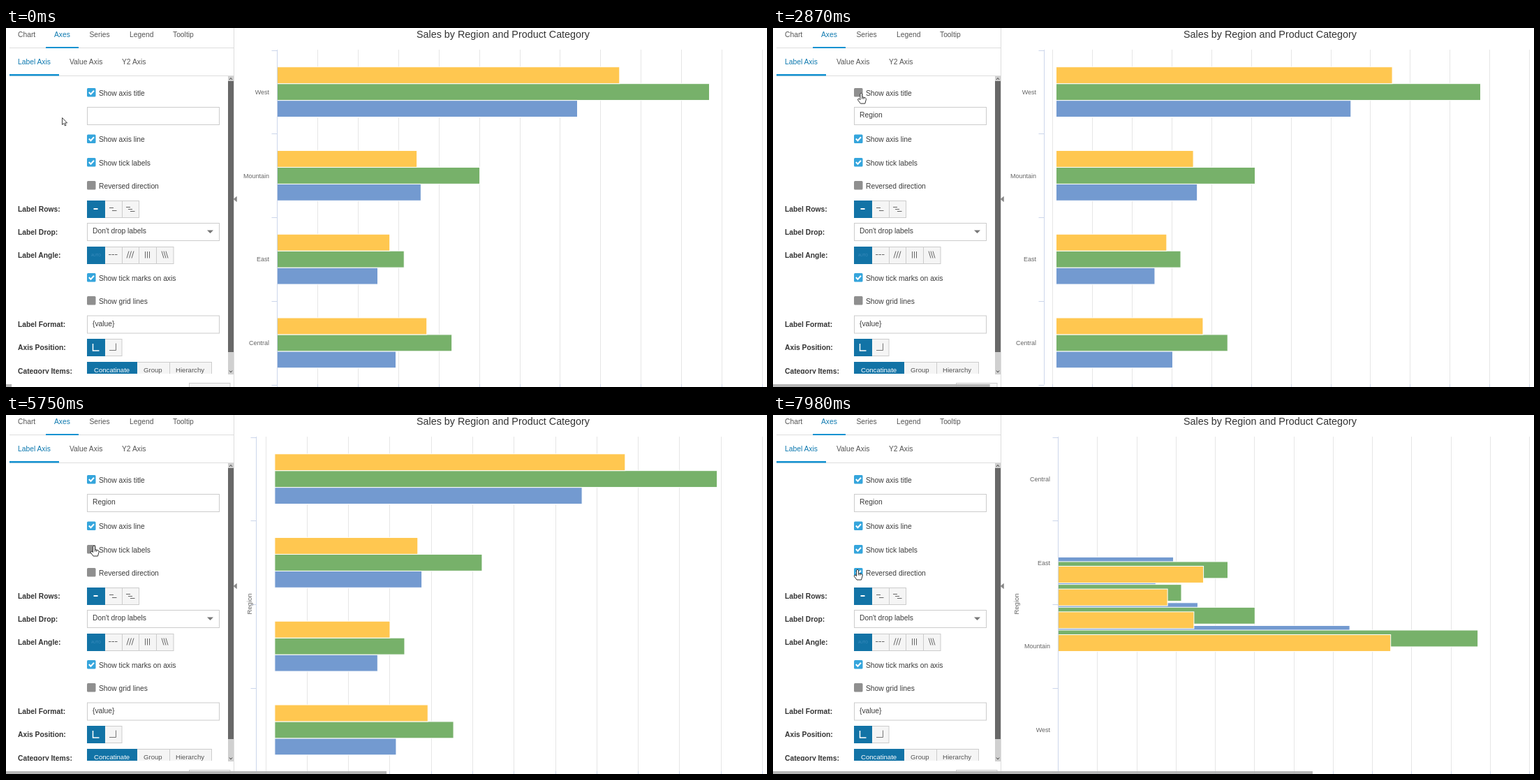
Recreate the animation shown at these times as an HTML page. Size 1090 by 514 pixels, loop 8 s.

```html
<!DOCTYPE html>
<html lang="en">
<head>
<meta charset="utf-8">
<title>Chart axis settings</title>
<style>
  html, body { margin: 0; width: 100%; height: 100%; overflow: hidden; background: #fff; }
  svg { display: block; font: 10.3px "Liberation Sans", Arial, sans-serif; fill: #3c3c3c; }
  .bold { font-weight: bold; fill: #333; }
  .tab { fill: #555; }
  .active { fill: #0f7ab0; }
  .small { font-size: 9.6px; }
  .category { font-size: 9px; fill: #666; text-anchor: end; }
  .click { mix-blend-mode: multiply; }
</style>
</head>
<body>
<svg width="1090" height="514" viewBox="0 0 1090 514">
  <g id="panel"></g><g id="controls"></g><g id="chart"></g><g id="overlay"></g>
</svg>
<script>
const LOOP = 8000, RIGHT = 1083, TOP = 31.5, PITCH = 119.75, BAR = 23.95;
const BLUE = '#1273a6', SKY = '#35a5dc', LINE = '#ddd', GRID = '#e6e6e6', AXIS = '#ccd6eb';
const COLORS = ['#ffc750', '#77b16a', '#739ad0'];
const REGIONS = [
  ['West', .7055, .8907, .6187],
  ['Mountain', .288, .4175, .2962],
  ['East', .232, .2615, .2072],
  ['Central', .3083, .36, .2446]
];

// Moments when the settings change
const TYPE = 760, FOCUS = 500, TITLE_OFF = 2660, TITLE_ON = 2880;
const LINE_OFF = 4020, LINE_GONE = 4770, LINE_ON = 5000;
const LABELS_OFF = 5425, LABELS_ON = 6150, REVERSE = 7687;
const PLOT_LEFT = [[0, 388], [TYPE, 408], [TITLE_OFF, 388], [TITLE_ON, 408], [LABELS_OFF, 358], [LABELS_ON, 408]];
const CLICKS = [[FOCUS, 650], [TITLE_OFF, 2780], [TITLE_ON, 3000], [LINE_OFF, 4850], [LINE_ON, 5100],
  [LABELS_OFF, 5560], [LABELS_ON, 6290], [7660, 7790]];
const POINTER = [[0, 80, 128], [120, 80, 128], [500, 165, 124], [1700, 165, 124], [2080, 131, 99], [2500, 128, 94],
  [3000, 126, 93], [3400, 121, 122], [3500, 121, 122], [3900, 126, 152], [5040, 126, 152], [5360, 126, 187],
  [6300, 126, 187], [7370, 121, 217], [7650, 121, 218], [7800, 121, 221], [LOOP, 121, 221]];
const PROGRESS = [[0, 8], [2080, 228], [3400, 366], [4040, 433], [4769, 433], [4770, 440], [5750, 545],
  [7370, 707], [LOOP, 775]];

const $ = id => document.getElementById(id);
const clamp = v => Math.min(1, Math.max(0, v));
const ease = v => .5 - Math.cos(Math.PI * clamp(v)) / 2;
const mix = (a, b, p) => a + (b - a) * p;
const within = (t, from, to) => t >= from && t < to;

const text = (x, y, s, cls = '') => `<text x="${x}" y="${y}" class="${cls}">${s}</text>`;
const rect = (x, y, w, h, fill, more = '') => `<rect x="${x}" y="${y}" width="${w}" height="${h}" fill="${fill}" ${more}/>`;
const path = (d, stroke, width = 1, fill = 'none') => `<path d="${d}" stroke="${stroke}" stroke-width="${width}" fill="${fill}"/>`;
const field = (y, stroke = '#ccc') => rect(116.5, y + .5, 189, 25, '#fff', `stroke="${stroke}"`);

function checkbox(y, label, on) {
  return rect(116, y - 6.5, 12.5, 12.5, on ? SKY : '#8f8f8f', 'rx="1.5"') +
    (on ? path(`M118.8 ${y - .5}l2.6 2.8 4.6-5`, '#fff', 2) : '') + text(133, y + 4, label);
}

function buttons(y, h, edges) {
  return edges.slice(1).map((end, i) => rect(edges[i] + .5, y + .5, end - edges[i], h,
    i ? '#f5f5f5' : BLUE, `stroke="${i ? '#ccc' : BLUE}"`)).reverse().join('');
}

function drawPanel() {
  const tabs = [[17, 13, 'Chart'], [69, 13, 'Axes'], [119.5, 13, 'Series'], [177, 13, 'Legend'], [239, 13, 'Tooltip'],
    [17, 52, 'Label Axis'], [91, 52, 'Value Axis'], [166, 52, 'Y2 Axis']];
  const labels = [[263, 'Label Rows:'], [296, 'Label Drop:'], [329, 'Label Angle:'], [428, 'Label Format:'], [461, 'Axis Position:']];
  return path('M5 28.5H326M5 68.5H326M326.5 0V514', LINE) +
    rect(57, 27, 47, 2, '#1492d1') + rect(5, 66, 71, 2.5, '#1492d1') +
    tabs.map(([x, y, s]) => text(x, y, s, /^Axes|^Label/.test(s) ? 'active' : 'tab')).join('') +
    labels.map(([y, s]) => text(17, y, s, 'bold')).join('') +
    // scrollbar and panel handle
    rect(318, 69, 8, 427, '#d0d0d0') + rect(318, 76, 8, 388, '#686868') +
    path('M320 74l2-2.5 2 2.5M320 490.500l2 2.5 2-2.500', '#444') +
    path('M330.500 241v8l-4.500-4z', 'none', 0, '#888') +
    // label rows
    buttons(247, 24, [116, 141, 166, 190]) + path('M125.500 259H131.500', '#fff', 2) +
    path('M148 257.500h6M152 261.500h6.500M172 256.500h6M175 259.500h6M178 262.500h6.500', '#666') +
    // label drop
    field(279) + text(124, 294, "Don't drop labels") + path('M288 289.500h9l-4.500 4.500z', 'none', 0, '#777') +
    // label angle
    buttons(313, 24, [116, 141, 166, 190, 215, 239.5]) +
    '<text x="122" y="327" font-size="5" fill="#3f8fc0">AUTO</text>' +
    path('M147 324.500h3.500M151.500 324.500h3.500M156 324.500h3.500', '#666') +
    path('M173 329.500l3-10M176.500 329.500l3-10M180 329.500l3-10M199.500 320v9.500M202.500 320v9.500M205.500 320v9.500' +
      'M223 319.500l3 10M226 319.500l3 10M229 319.500l3 10', '#666') +
    field(411.5) + text(124, 426.5, '{value}') +
    // axis position
    buttons(445, 24, [116, 141, 165.5]) + path('M124.500 452v10h9', '#fff', 1.5) + path('M148 461.500h9.500v-10', '#777') +
    // category items, cut by the panel edge
    '<svg width="318" height="495">' + text(17, 494.5, 'Category Items:', 'bold') + buttons(478, 24, [116, 187, 234, 294]) +
    '<text x="126" y="493" class="small" fill="#fff">Concatinate</text>' +
    text(197, 493, 'Group', 'small tab') + text(243, 493, 'Hierarchy', 'small tab') + '</svg>' +
    rect(262.5, 508.5, 58.5, 10, '#f4f4f4', 'stroke="#ccc"') +
    '<text x="712" y="14" font-size="14.350" text-anchor="middle" fill="#333">Sales by Region and Product Category</text>';
}

const typed = t => 'Region'.slice(0, Math.max(0, Math.floor((t - TYPE) / 110) + 1));
const titleShown = t => !within(t, TITLE_OFF, TITLE_ON);

function drawControls(t) {
  return checkbox(92.5, 'Show axis title', titleShown(t)) +
    field(113, within(t, FOCUS, TITLE_OFF) ? '#3fa3d8' : '#ccc') + text(124, 128, typed(t)) +
    checkbox(159, 'Show axis line', !within(t, LINE_OFF, LINE_ON)) +
    checkbox(192.5, 'Show tick labels', !within(t, LABELS_OFF, LABELS_ON)) +
    checkbox(225.5, 'Reversed direction', t >= REVERSE) +
    checkbox(357.5, 'Show tick marks on axis', true) +
    checkbox(390.5, 'Show grid lines', false);
}

// Left edge of the plot, following each change with a delay
const plotLeft = (t, delay) => PLOT_LEFT.reduce((x, [start, left], i) =>
  i ? mix(x, left, ease((t - start - delay) / 500)) : left, 0);

function drawChart(t) {
  const left = PLOT_LEFT.filter(([start]) => start <= t).pop()[1];
  const scaleLeft = plotLeft(t, 0), barLeft = plotLeft(t, 85), span = RIGHT - scaleLeft;
  const flip = ease((t - REVERSE) / 500), reversed = t >= REVERSE;
  const lineOff = within(t, LINE_GONE, LINE_ON);
  let grid = '', feet = '', ticks = '', bars = '', labels = '';

  for (let i = 0; i <= 12; i++) {
    const x = Math.round(scaleLeft + span * i / 12) + .5;
    grid += `M${x} 31V510`;
    feet += `M${x} 510V514`;
  }
  for (let i = 0; i <= 4; i++) ticks += `M${left - 7.5} ${Math.round(TOP + PITCH * i) + .5}h8`;

  for (let series = 2; series >= 0; series--) {
    REGIONS.forEach((region, i) => {
      const y = TOP + PITCH * i + 24.2 + BAR * series;
      bars += rect(barLeft + .5, mix(y, 542 - BAR - y, flip), span * region[series + 1], BAR, COLORS[series], 'stroke="#fff"');
    });
  }
  if (!within(t, LABELS_OFF, LABELS_ON)) {
    REGIONS.forEach(([name], i) => {
      labels += text(left - 11, TOP + PITCH * ((reversed ? 3 - i : i) + .5) + 3.5, name, 'category');
    });
  }
  const title = titleShown(t) ? `<text transform="translate(352 270.5) rotate(-90)" font-size="9.5"
    text-anchor="middle" fill="#666">${typed(t)}</text>` : '';
  return path(grid, GRID) + path(feet, AXIS) + path(ticks, lineOff ? LINE : AXIS) + bars +
    (lineOff ? '' : path(`M${left + .5} 31V510.500`, AXIS)) + labels + title +
    path('M330.500 241v8l-4.500-4z', 'none', 0, '#888');
}

function along(keys, t, column, curve) {
  const i = Math.max(1, keys.findIndex(k => k[0] > t));
  const a = keys[i - 1], b = keys[i];
  return mix(a[column], b[column], curve((t - a[0]) / (b[0] - a[0])));
}

function drawPointer(x, y) {
  const overBox = [92.5, 159, 192.5, 225.5].some(row => y > row - 9 && y < row + 6);
  let shape;
  if (x > 115 && y > 113 && y < 139) {
    shape = path('M-2-5H2M0-5V5M-2 5H2', '#555');
  } else if (x > 115 && overBox) {
    shape = path('M-1.400 1Q0-.8 1.400 1V5.500L6 6.800Q7.500 7.400 7 9.500L5.500 15H-1L-4.800 9.800Q-5 7.800-3 8.200L-1.400 9.600Z' +
      'M1.400 5.500V8.500M3.700 6.200V8.800', '#333', 1, '#fff');
  } else {
    shape = path('M.5 .5V10.500L2.800 8.400 4.400 12 6 11.300 4.500 7.900H7.600Z', '#444', 1, '#fff');
  }
  return `<g transform="translate(${x} ${y})">${shape}</g>`;
}

function drawOverlay(t) {
  const x = along(POINTER, t, 1, ease), y = along(POINTER, t, 2, ease);
  const clicking = CLICKS.some(([from, to]) => within(t, from, to));
  return rect(0, 510, along(PROGRESS, t, 1, clamp), 4, '#b0b0b0', 'opacity=".92"') +
    (clicking ? `<circle class="click" cx="${x - 1}" cy="${y + 1}" r="9.5" fill="#fff02a"/>` : '') +
    drawPointer(x, y);
}

function frame() {
  const t = performance.now() % LOOP;
  $('controls').innerHTML = drawControls(t);
  $('chart').innerHTML = drawChart(t);
  $('overlay').innerHTML = drawOverlay(t);
  requestAnimationFrame(frame);
}

$('panel').innerHTML = drawPanel();
frame();
</script>
</body>
</html>
```
